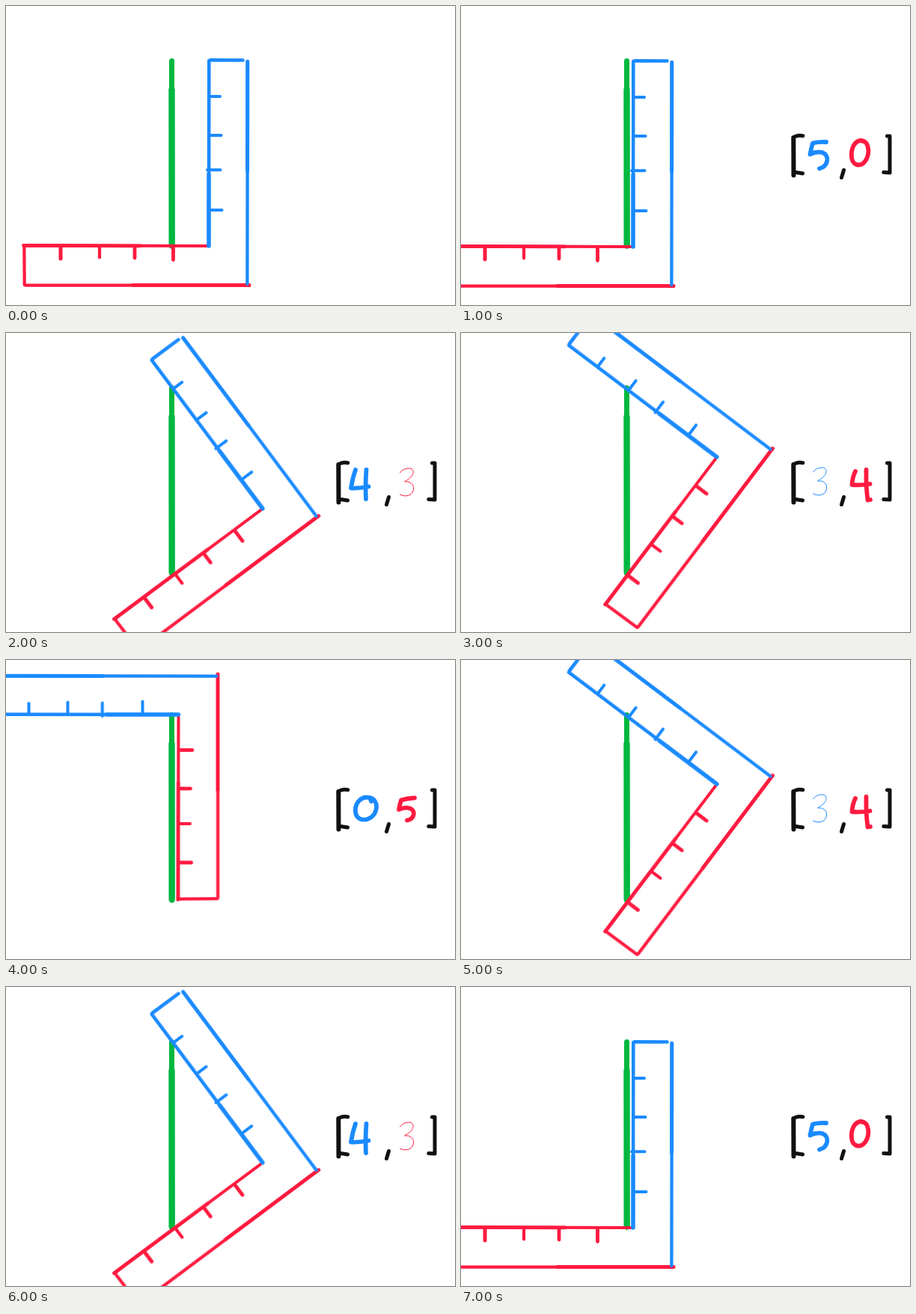
An HTML page that plays this animation: 600x400 px, repeating every 8 s.

```html
<!DOCTYPE html>
<html lang="en">
<head>
<meta charset="utf-8">
<title>Measuring with a square</title>
<style>
  html, body { margin: 0; width: 100%; height: 100%; overflow: hidden; background: #fff; }
  svg { display: block; width: 600px; height: 400px; }
  path { fill: none; stroke: currentColor; stroke-linecap: round; stroke-linejoin: round; }
  .red { color: #ff1a40; }
  .blue { color: #1a8aff; }
  .green { color: #00b840; }
  .ink { color: #111; }
  .digits path { stroke-width: 5.8; }

  #square, .label { animation: 8s step-end infinite; }
  #square { animation-name: turn; }
  .label { opacity: 0; }
  #brackets { animation-name: brackets; }
  #five-zero { animation-name: five-zero; }
  #four-three { animation-name: four-three; }
  #three-four { animation-name: three-four; }
  #zero-five { animation-name: zero-five; }

  @keyframes turn {
    0% { transform: translate(271px, 321px) rotate(0deg); }
    12.5%, 87.5% { transform: translate(230px, 322px) rotate(0deg); }
    25%, 75% { transform: translate(343px, 235px) rotate(-36.8deg); }
    37.5%, 62.5% { transform: translate(342px, 166px) rotate(-53deg); }
    50% { transform: translate(230.5px, 73px) rotate(-90deg); }
    100% { transform: translate(271px, 321px) rotate(0deg); }
  }
  @keyframes brackets { 0% { opacity: 0; } 12.5%, 100% { opacity: 1; } }
  @keyframes five-zero { 0%, 25% { opacity: 0; } 12.5%, 87.5%, 100% { opacity: 1; } }
  @keyframes four-three { 0%, 37.5%, 87.5%, 100% { opacity: 0; } 25%, 75% { opacity: 1; } }
  @keyframes three-four { 0%, 50%, 75%, 100% { opacity: 0; } 37.5%, 62.5% { opacity: 1; } }
  @keyframes zero-five { 0%, 62.5%, 100% { opacity: 0; } 50% { opacity: 1; } }
</style>
</head>
<body>
<svg viewBox="0 0 600 400">
  <g class="green">
    <path stroke-width="7" d="M221.5 73.5V321"/>
    <path stroke-width="8.4" d="M221.5 112L221.7 320.5"/>
  </g>

  <!-- The square turns about its inner corner. -->
  <g id="square">
    <g transform="translate(-271 -321)">
      <g class="red">
        <path stroke-width="4.2" d="M23.5 320.3L271 321M24.3 321L24.7 373M125 322V336.5"/>
        <path stroke-width="4.8" d="M23.5 320.3L180 320.8M172 322V337M223.5 322V339.5"/>
        <path stroke-width="4.2" d="M26 373.7H325"/>
        <path stroke-width="5" d="M170 373.6H325M73 322V338"/>
      </g>
      <g class="blue">
        <path stroke-width="4.6" d="M273 72.3L316.5 72.5M271.3 73L271 321"/>
        <path stroke-width="5.4" d="M271 225V321"/>
        <path stroke-width="4.3" d="M322.8 74L322.4 372"/>
        <path stroke-width="5" d="M322.8 74.5L322.6 220"/>
        <path stroke-width="4" d="M272 121H286M272 173H287.5M269 219.3H286.5M272 273H288.5"/>
      </g>
    </g>
  </g>

  <g id="brackets" class="label ink">
    <path stroke-width="6" d="M444.3 176L444.5 226.5"/>
    <path stroke-width="5" d="M447 174.3Q452 172.7 456.8 173.7M447 222.5L456.5 224"/>
    <path stroke-width="5" d="M569.5 174H573L573 223L564.8 222.5M511.5 219.5L508.5 229.5"/>
  </g>

  <defs>
    <path id="three" d="M-9 -13Q-5 -19 3 -19C11 -19 10 -10 3 -5C0 -3 -2 -2 -3 -1C4 -2 10 2 9 9C8 18 -2 20 -9 16"/>
  </defs>
  <g id="five-zero" class="label digits">
    <path class="blue" d="M488 182Q477 181.500 470 183.500Q468 190 466.500 198.500Q475 194 483 196C493 200 491 214 479 217.500"/>
    <path class="red" d="M535 180C525 180 521 192 522 202C523 213 532 215 538 210C545 203 546 192 542 184Q539 180 533 180"/>
  </g>
  <g id="four-three" class="label digits">
    <path class="blue" d="M467 183Q463 194 461 207.500Q473 208 484.500 205.500M481.500 183Q480 203 481 222"/>
    <use class="red" href="#three" x="535.5" y="200"/>
  </g>
  <g id="three-four" class="label digits">
    <use class="blue" href="#three" x="479.5" y="199"/>
    <path class="red" d="M527 185Q523 193 522.500 203Q534 204 546.500 202M541.500 183Q541 205 543.500 223.500L547 223"/>
  </g>
  <g id="zero-five" class="label digits">
    <path class="blue" d="M485 184C474 182 466 192 467 203C468 214 479 216 487 211C495 206 497 195 493 189Q491 185 486 184L488 189"/>
    <path class="red" d="M546 184.500Q536 185 528 187.500Q526.500 192 525 200Q534 196 541 199C548 203 545 213 536 214.500"/>
  </g>
</svg>
</body>
</html>
```
